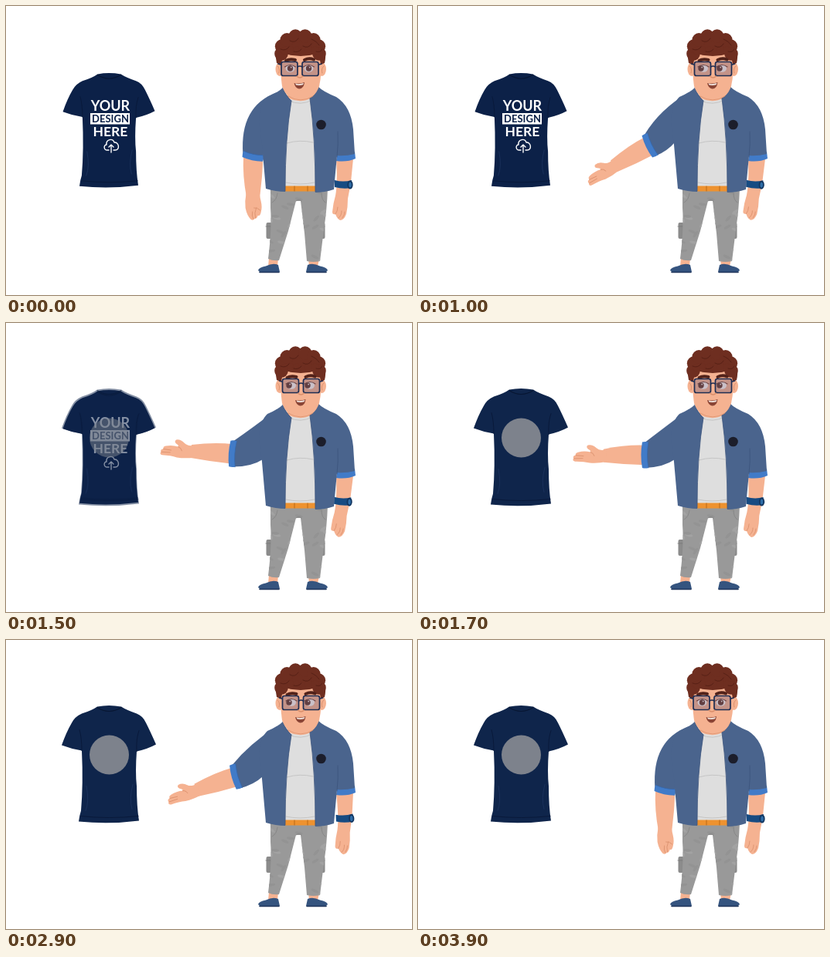
An HTML page with a canvas that plays this animation: 525x375 px, repeating every 4000 ms.

```html
<!DOCTYPE html>
<html lang="en">
<head>
<meta charset="utf-8">
<title>T-shirt designer</title>
<style>
  html, body { margin: 0; width: 100%; height: 100%; overflow: hidden; background: #fff; }
  canvas { display: block; width: 525px; height: 375px; }
</style>
</head>
<body>
<canvas id="stage" width="525" height="375"></canvas>
<script>
const ctx = document.getElementById('stage').getContext('2d');
const LOOP = 4000;
const SKIN = '#f5b291', SKIN_LINE = '#d98e6b', JACKET = '#4a648d', SEAM = '#3c547c';
const CUFF = '#417bc8', HAIR = '#6e2e20', NAVY = '#0c2148', GLASSES = '#1e2d52';

const lerp = (a, b, k) => a + (b - a) * k;
const clamp = v => Math.max(0, Math.min(1, v));
const ease = k => k < 0.5 ? 4 * k ** 3 : 1 - (2 - 2 * k) ** 3 / 2;

function track(keys, t) {
  if (t <= keys[0][0]) return keys[0][1];
  for (let i = 1; i < keys.length; i++) {
    const [t0, v0] = keys[i - 1], [t1, v1] = keys[i];
    if (t <= t1) return lerp(v0, v1, ease((t - t0) / (t1 - t0)));
  }
  return keys[keys.length - 1][1];
}

function fill(color, d) {
  ctx.fillStyle = color;
  ctx.fill(new Path2D(d));
}

function line(color, width, d) {
  ctx.strokeStyle = color;
  ctx.lineWidth = width;
  ctx.lineCap = ctx.lineJoin = 'round';
  ctx.stroke(new Path2D(d));
}

function oval(color, x, y, rx, ry = rx) {
  ctx.fillStyle = color;
  ctx.beginPath();
  ctx.ellipse(x, y, rx, ry, 0, 0, 7);
  ctx.fill();
}

function box(x, y, w, h, r, color) {
  ctx.fillStyle = color;
  ctx.beginPath();
  ctx.roundRect(x, y, w, h, r);
  ctx.fill();
}

function placed(x, y, angle, draw) {
  ctx.save();
  ctx.translate(x, y);
  ctx.rotate(angle);
  draw();
  ctx.restore();
}

// Drawn around its own centre so that both shirts can share it.
function tee(scale, color) {
  ctx.save();
  ctx.translate(133, 161.5);
  ctx.scale(scale, scale);
  fill(color, `M-15 -75Q0 -78 16 -75Q22 -71 36 -66Q44 -63 48 -54Q54 -42 61 -26
    Q50 -20 36 -17Q34 10 36 28Q36 55 39 73Q0 78 -39 74Q-38 66 -36 60
    Q-33 25 -35 -18Q-48 -20 -61 -25Q-55 -42 -48 -54Q-44 -62 -35 -66Q-22 -70 -15 -75Z`);
  line('#071632', 1.2, 'M-15 -74Q0 -64 16 -74');
  line('#09193a', 1, 'M-35 -18Q-35 -35 -38 -45M36 -17Q35 -33 39 -44M-36 67Q0 71 38 67');
  line('#1a315b', 1, 'M-29 28Q-25 48 -30 60M31 26Q26 44 30 58');
  ctx.restore();
}

function label(text, size, y, color) {
  ctx.font = `bold ${size}px Lato, "Open Sans", sans-serif`;
  ctx.textAlign = 'center';
  ctx.fillStyle = color;
  ctx.fillText(text, 135, y);
}

function tshirt(t) {
  const swap = clamp((t - 1400) / 200);
  if (swap < 1) {
    tee(0.975, NAVY);
    label('YOUR', 18, 136, '#fff');
    box(109, 139, 51, 14.5, 0, '#fff');
    label('DESIGN', 13, 151, NAVY);
    label('HERE', 17.5, 169, '#fff');
    line('#fff', 1.4, `M133 187H131C126 187 126 180 130 180C129 173 138 171 140 177
      C146 176 148 187 141 187H139M136 190V180M133 183L136 180L139 183`);
  }
  if (swap > 0) {
    ctx.save();
    ctx.globalAlpha = swap;
    tee(1, '#0f254b');
    oval('#7d828c', 133.5, 149, 25.5);
    ctx.restore();
  }
}

function legs() {
  const shoe = x => {
    fill('#35547f', `M${x} 343Q${x + 1} 339 ${x + 10} 337.5Q${x + 19} 333 ${x + 26} 336L${x + 28} 345H${x + 2}Z`);
    line('#22375c', 1.6, `M${x + 2} 345.5H${x + 27}`);
  };
  fill(SKIN, 'M340 327H352L351 338Q345 340 339 338ZM391 328H405L403 338Q397 341 392 338Z');
  shoe(326);
  ctx.save();
  ctx.translate(742, 0);
  ctx.scale(-1, 1);
  shoe(326);
  ctx.restore();
  box(336.5, 281, 8, 21, 2, '#8b8b8b');
  box(405, 281, 7.5, 21, 2, '#8b8b8b');
  line('#777', 0.8, 'M336 286H342M407 286H412');
  const pants = new Path2D(`M342 236H416Q415 265 411 290L406 331Q398 333 389 331L386 295L381 253H375
    L365 292L353 330Q345 331 339 328Q344 288 342 262Z`);
  ctx.save();
  ctx.clip(pants);
  ctx.fillStyle = '#999';
  ctx.fillRect(330, 230, 95, 110);
  let seed = 11;
  const random = () => (seed = seed * 16807 % 2147483647) / 2147483647;
  for (let i = 0; i < 34; i++) {
    const x = 340 + random() * 74, y = 242 + random() * 88;
    placed(x, y, random() * 2 - 1, () => oval(i % 2 ? '#939393' : '#a2a2a2', 0, 0, 5, 1.8));
  }
  ctx.restore();
  line('#858585', 0.9, 'M375 253Q379 250 382 253M351 243Q350 252 344 255M408 243Q408 252 413 255');
}

function torso() {
  fill(SKIN, 'M358 100H404L396 122Q381 130 366 123Z');
  fill('#dedede', 'M366 120Q381 127 396 119L402 236H358Z');
  line('#c5c5c5', 1, 'M366 123Q381 130 396 122M363 178Q380 173 397 177M362 229Q380 233 399 229');
  box(360, 233.5, 41, 7, 1, '#ee922f');
  line('#b9681b', 1, 'M373 234V240M390 234V240');
  fill(JACKET, `M358 106Q352 112 338 118Q328 127 327 150L331 180L336 237Q349 241 361 241
    Q360 180 369 123Q362 116 358 106Z`);
  fill(JACKET, `M404 105Q410 111 427 118Q446 130 449 160L451 192Q439 195 428 194L424 238
    Q412 242 400 242Q401 178 393 120Q400 114 404 105Z`);
  line(SEAM, 0.8, 'M428 196Q430 178 429 163M369 123Q361 170 361 240M393 120Q400 170 400 241');
  line(SEAM, 0.8, 'M358 106Q361 116 369 123M404 105Q401 114 393 120');
  oval('#1c1e2b', 407.5, 154, 6.3);
}

function restingHand() {
  fill(SKIN, `M48 9Q58 11 67 10Q77 8 82 3Q84 0 81 -2Q81 -5 77 -6Q78 -9 73 -10
    Q66 -12 58 -10Q54 -9 48 -8Z`);
  line(SKIN_LINE, 0.8, 'M67 -4Q74 -1 80 -3M70 -9Q66 -5 67 -1M72 1Q78 2 81 0');
}

function openHand() {
  fill(SKIN, `M50 8Q59 6 63 10Q68 15 74 14Q77 12 74 9Q70 7 71 5Q79 7 87 5
    Q91 4 90 1Q94 1 93 -3Q95 -6 91 -7Q80 -7 72 -9Q62 -10 50 -8Z`);
  line(SKIN_LINE, 0.8, 'M71 5Q67 4 66 0M90 1L80 0M92 -3L81 -3');
}

function leftArm(raise) {
  const rad = Math.PI / 180;
  const upper = (78 - 43 * raise) * rad, fore = (90 - 89 * raise) * rad;
  const cuff = (78 - 78 * raise) * rad;
  const reach = 50 - 6 * raise, half = 13.5 + 3.2 * raise;
  const x = 330 - Math.cos(upper) * reach, y = 146 + Math.sin(upper) * reach;
  const across = [-Math.sin(cuff) * half, -Math.cos(cuff) * half];

  placed(x, y, Math.PI - fore, () => {
    fill(SKIN, 'M0 12.5Q24 14 54 8.5V-8.5Q26 -12 0 -13Z');
    raise < 0.5 ? restingHand() : openHand();
  });
  fill(JACKET, `M350 112Q${lerp(302, 318, raise)} ${lerp(130, 136, raise)} ${x + across[0]} ${y + across[1]}
    L${x - across[0]} ${y - across[1]}
    Q${lerp(333, 318, raise)} ${lerp(190, 187, raise)} 332 177L350 150Z`);
  placed(x, y, Math.PI - cuff, () => {
    fill(CUFF, `M-4 ${half}Q0 ${half + 1} 4 ${half}Q7 0 4 ${-half}Q0 ${-half - 1} -4 ${-half}Q-1 0 -4 ${half}Z`);
    line('#3467ad', 0.7, `M-4 ${half}Q-1 0 -4 ${-half}`);
  });
}

function rightArm(sway) {
  placed(438, 198, sway * Math.PI / 180, () => {
    fill(SKIN, `M-11 0H11L8 30Q6 42 4 52Q4 63 2 72Q-1 80 -6 80Q-10 78 -12 72
      Q-16 73 -16 69Q-15 58 -12 48Q-9 32 -11 0Z`);
    line(SKIN_LINE, 0.8, 'M-12 72Q-9 68 -9 63M-8 77Q-4 74 -4 68M-3 77Q0 73 0 69');
    fill('#174b82', 'M-13 28Q-2 31 9 28L9 38Q-2 40 -13 37Z');
    oval('#12355f', 7, 34, 3.6, 5.5);
    oval('#2e6da8', 7, 34, 1.8, 3.5);
  });
  fill(CUFF, 'M428 193Q440 194 451 189L452 198Q441 203 427 201Z');
}

function face(turn) {
  line('#53231a', 4, 'M362 71Q367 68 374 70M386 70Q392 67 398 69.5');
  for (const x of [367.5, 391.5]) {
    const pupil = x - 3 * turn;
    oval('#fff', x, 81, 6, 4.8);
    oval('#4d2219', pupil, 81, 3.7);
    oval('#fff', pupil + 1.2, 79.6, 0.9);
    line('#58271d', 1.1, `M${x - 7} 79Q${x} 74 ${x + 7} 79`);
  }
  for (const x of [356, 383]) {
    box(x, 72.5, 21, 18, 2.5, 'rgba(129,105,125,.42)');
    ctx.strokeStyle = GLASSES;
    ctx.lineWidth = 1.7;
    ctx.stroke();
  }
  line(GLASSES, 1.7, 'M377 79Q380 77 383 79M355 76L352 75M405 76L408 75');
  line(SKIN_LINE, 1.2, 'M376 91Q380 95 384 91');
  fill('#8a4435', 'M372.5 100Q379 101.5 386 99Q385 107.5 379 107.5Q374 107 372.5 100Z');
  fill('#f2e6e0', 'M374 100.5Q379 102 385 100L384 102.3Q379 103.5 375 102.5Z');
}

function head(turn) {
  oval(SKIN, 354, 82, 5.5, 9);
  oval(SKIN, 408.5, 82, 5.5, 9);
  line(SKIN_LINE, 0.9, 'M351 78Q355 81 353 87M411 78Q407 81 409 87');
  fill(SKIN, 'M356 62Q380 50 407 62Q409 86 405 104Q399 122 381 122Q363 122 357 104Q354 84 356 62Z');
  line(SKIN_LINE, 0.7, 'M365 117Q381 127 397 117');

  fill(HAIR, `M350 74Q346 57 354 47Q380 34 406 47Q416 58 412 74L407 76Q406 66 401 62
    Q381 68 361 62Q357 67 356 76Z`);
  for (let i = 0; i < 8; i++) {
    const a = Math.PI * (1 + (i - 0.4) / 6.2);
    oval(HAIR, 380.5 + Math.cos(a) * 25, 58 + Math.sin(a) * 19.5, 8.8);
  }
  for (let i = 0; i < 6; i++) oval(HAIR, 361 + i * 7.7, 58, 5.5);
  line('#552016', 0.9, `M355 56Q362 59 366 53M367 45Q374 49 378 42M384 52Q391 56 395 49
    M395 43Q402 46 405 51M372 59Q378 61 382 56M401 59Q407 61 409 56`);
  placed(1.5 * turn, 0, 0, () => face(turn));
}

const RAISE = [[650, 0], [1300, 1.1], [1700, 1], [2550, 1], [3500, 0]];
const SWAY = [[650, 0], [1300, 2.2], [1700, 0.8], [2550, 0.8], [2950, -3], [3700, 0]];

function render(now) {
  const t = now % LOOP;
  const raise = track(RAISE, t);
  ctx.fillStyle = '#fff';
  ctx.fillRect(0, 0, 525, 375);
  tshirt(t);
  legs();
  rightArm(track(SWAY, t));
  leftArm(raise);
  torso();
  head(ease(clamp(raise * 1.4)));
}

const start = performance.now();
function tick() {
  render(performance.now() - start);
  requestAnimationFrame(tick);
}
tick();
</script>
</body>
</html>
```
